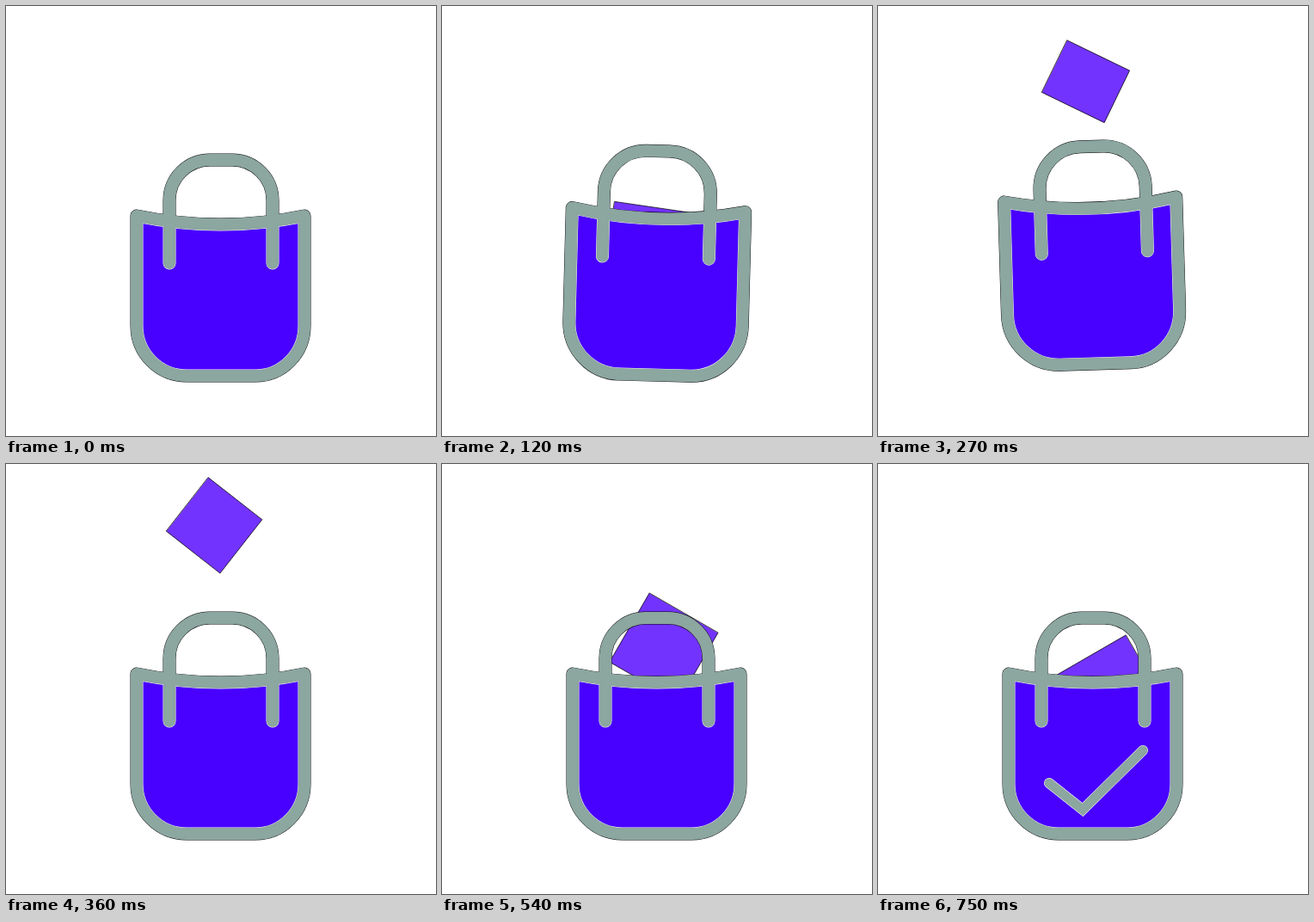
Animation of 500 by 500 pixels, one loop 1.38 s. Source, as an HTML page with a canvas:

```html
<!DOCTYPE html>
<html lang="en">
<head>
<meta charset="utf-8">
<title>Bag</title>
<style>
  html, body { margin: 0; height: 100%; overflow: hidden; background: #fff; }
  canvas { display: block; width: 500px; height: 500px; }
</style>
</head>
<body>
<canvas id="stage" width="500" height="500"></canvas>
<script>
const ctx = document.getElementById('stage').getContext('2d');
const LOOP = 1380, STEP = 30;
const GREY = '#8ca6a0', BLUE = '#4800ff', VIOLET = '#7333ff';

const bag = new Path2D('M152 244V372A58 58 0 0 0 210 430H290A57 58 0 0 0 347 372V244Q249.5 264 152 244Z');
const handle = new Path2D('M190 299V226A47 47 0 0 1 237 179H263A47 47 0 0 1 310 226V299');
const tick = new Path2D('M199 371L238 402L308 333');
const TICK_LENGTH = Math.hypot(39, 31) + Math.hypot(70, 69);

const clamp = x => Math.min(1, Math.max(0, x));
const mix = (a, b, k) => a + (b - a) * k;
const smooth = x => (1 - Math.cos(Math.PI * clamp(x))) / 2;
const rad = deg => deg * Math.PI / 180;

function line(path, color, width, join = 'round') {
  ctx.strokeStyle = color;
  ctx.lineWidth = width;
  ctx.lineJoin = join;
  ctx.lineCap = 'round';
  ctx.stroke(path);
}

// The box is thrown up out of the bag for 300 ms, then tumbles back in.
function boxPose(t) {
  if (t < 300) {
    const u = t / 300, k = u ** 1.4;
    return { x: mix(247, 241, u), y: mix(365, 56, u ** 1.03), turn: 30 * k, w: mix(97, 78, k), h: 78 * k };
  }
  const k = smooth((t - 300) / 360), size = mix(78, 97, k);
  return { x: mix(242, 270.2, k * k), y: mix(57.5, 265.3, k), turn: mix(30, 150, k), w: size, h: size };
}

function drawBox(t) {
  const { x, y, turn, w, h } = boxPose(t);
  ctx.save();
  ctx.translate(x, y);
  ctx.rotate(rad(turn));
  ctx.fillStyle = VIOLET;
  ctx.fillRect(-w / 2, -h / 2, w, h);
  ctx.strokeStyle = '#000';
  ctx.lineWidth = 0.7;
  ctx.strokeRect(-w / 2, -h / 2, w, h);
  ctx.restore();
}

function drawTick(t) {
  const k = smooth((t - 540) / 210);
  if (!k) return;
  ctx.setLineDash([TICK_LENGTH * k, TICK_LENGTH * 2]);
  line(tick, '#fff', 12, 'miter');
  line(tick, GREY, 11, 'miter');
  ctx.setLineDash([]);
}

// Each part sways and swells about its own centre; the handle leads the bag.
function sway(path, t, centerY, height, lag) {
  const u = clamp(t / 360);
  const scale = 1 + 0.038 * Math.sin(Math.PI * u);
  const turn = 1.7 * Math.sin(2 * Math.PI * u);
  const matrix = new DOMMatrix()
    .translate(249.5, centerY - height * Math.sin(Math.PI * u ** lag))
    .rotate(turn)
    .scale(scale)
    .translate(-249.5, -centerY);
  const moved = new Path2D();
  moved.addPath(path, matrix);
  return moved;
}

function drawBag(t) {
  const body = sway(bag, t, 337, 16.5, 2.35);
  const parts = [body, sway(handle, t, 239, 15.5, 1.55)];
  for (const path of parts) line(path, '#000', 15);
  ctx.save();
  ctx.clip(body);
  ctx.fillStyle = BLUE;
  ctx.fill(body);
  for (const path of parts) line(path, '#fff', 15);
  ctx.restore();
  for (const path of parts) line(path, GREY, 14.2);
  drawTick(t);
}

const start = performance.now();
function frame() {
  const elapsed = (performance.now() - start) % LOOP;
  const t = Math.floor(elapsed / STEP) * STEP;
  ctx.clearRect(0, 0, 500, 500);
  drawBox(t);
  drawBag(t);
  requestAnimationFrame(frame);
}
frame();
</script>
</body>
</html>
```
